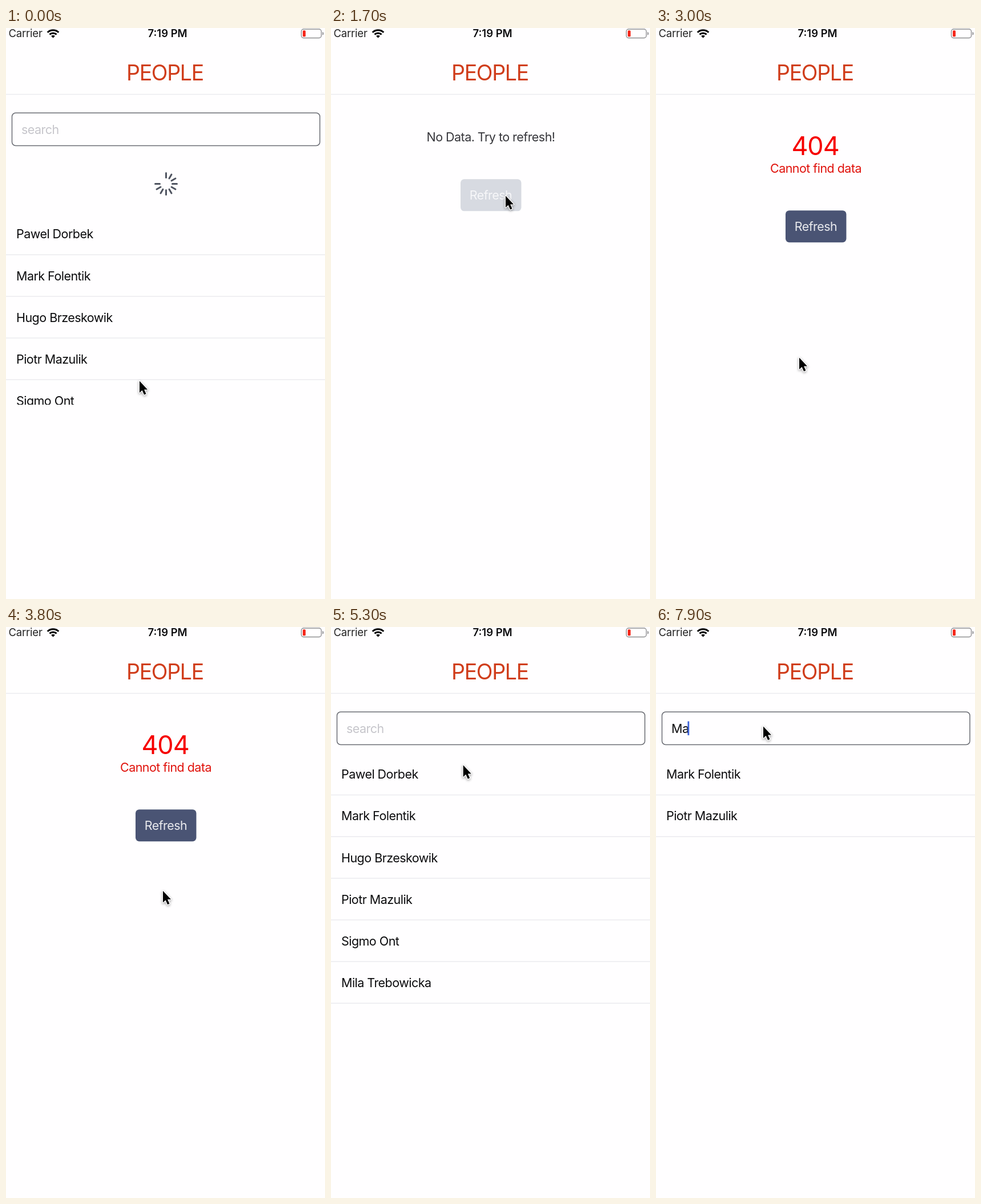
An HTML page with a canvas that plays this animation: 559 px wide and 1002 px high, repeating every 8000 ms.

```html
<!DOCTYPE html>
<html lang="en">
<head>
<meta charset="utf-8">
<title>People list</title>
<style>
  html, body { margin: 0; width: 100%; height: 100%; overflow: hidden; background: #fffeff; }
  canvas { display: block; width: 559px; height: 1002px; }
</style>
</head>
<body>
<canvas id="stage"></canvas>
<script>
const W = 559, H = 1002, LOOP = 8000, STEP = 100;
const BG = '#fffeff', LINE = '#ebebef', SLATE = '#4a5474';
const MID = 280;
const LIST_TOP = 222, LIST_BOTTOM = 661, ROW = 73.1;

const canvas = document.getElementById('stage');
const ctx = canvas.getContext('2d');
const dpr = window.devicePixelRatio || 1;
canvas.width = W * dpr;
canvas.height = H * dpr;

const people = ['Pawel Dorbek', 'Mark Folentik', 'Hugo Brzeskowik',
  'Piotr Mazulik', 'Sigmo Ont', 'Mila Trebowicka'];

// Timelines: [start, value]; the latest started entry applies.
const scenes = [[0, 'list'], [300, 'empty'], [1900, 'list'], [2900, 'error'], [4600, 'list']];
const presses = [[0, false], [1500, true], [1800, false], [4400, true], [4600, false]];
const queries = [[0, ''], [6100, 'M'], [7700, 'Ma']];
const grabs = [[0, 373], [300, null], [2400, 247], [2900, null]];
const FOCUS = 5600;

// Pointer path: [time, x, y]
const path = [
  [0, 233, 618], [100, 233, 668], [200, 233, 703], [300, 233, 713],
  [400, 233, 713], [1300, 305, 293], [1900, 305, 293], [2300, 250, 247],
  [2400, 250, 247], [2800, 250, 577], [3400, 250, 577], [4200, 298, 346],
  [4900, 298, 346], [5600, 187, 173], [LOOP, 187, 173]
];

const entryAt = (list, t) => list.filter(e => e[0] <= t).pop();
const valueAt = (list, t) => entryAt(list, t)[1];

function pointerAt(t) {
  const i = path.findIndex(p => p[0] > t);
  const [t0, x0, y0] = path[i - 1], [t1, x1, y1] = path[i];
  const u = (t - t0) / (t1 - t0), k = u * u * (3 - 2 * u);
  return { x: x0 + (x1 - x0) * k, y: y0 + (y1 - y0) * k };
}

// Elastic resistance of an overscrolled list
function rubber(pull) {
  const size = LIST_BOTTOM - LIST_TOP;
  return pull > 0 ? size * (1 - 1 / (pull * 0.55 / size + 1)) : 0;
}

function text(str, x, y, { size = 21.5, color = '#0b0b0d', align = 'left', weight = 400, track = -0.025 } = {}) {
  ctx.font = `${weight} ${size}px Inter, Roboto, sans-serif`;
  ctx.letterSpacing = `${size * track}px`;
  ctx.textAlign = align;
  ctx.fillStyle = color;
  ctx.fillText(str, x, y);
  return ctx.measureText(str).width;
}

function box(x, y, w, h, r) {
  ctx.beginPath();
  ctx.roundRect(x, y, w, h, r);
}

function divider(y) {
  ctx.fillStyle = LINE;
  ctx.fillRect(0, y - 0.75, W, 1.5);
}

function drawStatus() {
  text('Carrier', 4.5, 16.2, { size: 18.5, color: '#222', track: -0.01 });
  text('7:19 PM', 283, 16.2, { size: 18.5, align: 'center', weight: 600, track: 0 });

  const cx = 82.5, cy = 17.5, a = Math.PI / 4;
  ctx.fillStyle = ctx.strokeStyle = '#000';
  ctx.lineWidth = 3;
  ctx.beginPath();
  ctx.moveTo(cx, cy);
  ctx.arc(cx, cy, 4.8, -3 * a, -a);
  ctx.fill();
  for (const r of [8.6, 13.8]) {
    ctx.beginPath();
    ctx.arc(cx, cy, r, -3 * a, -a);
    ctx.stroke();
  }

  ctx.strokeStyle = '#8e8e91';
  ctx.lineWidth = 1.4;
  box(517.5, 2, 35, 15.5, 4);
  ctx.stroke();
  ctx.fillStyle = '#8e8e91';
  box(554.5, 7, 2, 5.5, [0, 2, 2, 0]);
  ctx.fill();
  ctx.fillStyle = '#f5291c';
  box(520, 4.3, 5, 11, 1.5);
  ctx.fill();
}

function drawHeader() {
  text('PEOPLE', 278.5, 92, { size: 37.5, color: '#d03d1b', align: 'center', track: -0.035 });
  divider(116.5);
}

function drawSearch(t, query) {
  ctx.strokeStyle = '#6a6c73';
  ctx.lineWidth = 1.5;
  box(10.5, 149, 539.5, 57.5, 6.5);
  ctx.stroke();
  let caret = 27;
  if (query) caret += text(query, 27, 185.5) - 2;
  else text('search', 27, 185.5, { color: '#c6c5cb' });

  const since = t - Math.max(FOCUS, entryAt(queries, t)[0]);
  if (t >= FOCUS && since % 1000 < 500) {
    ctx.fillStyle = '#3d63dc';
    ctx.fillRect(caret, 165.5, 2.8, 24.5);
  }
}

function drawSpinner(offset) {
  const ticks = Math.min(12, Math.floor(offset / 10.2));
  ctx.save();
  ctx.translate(MID + 0.5, LIST_TOP + offset / 2);
  ctx.strokeStyle = '#4f5460';
  ctx.lineWidth = 3;
  ctx.lineCap = 'round';
  for (let i = 0; i < ticks; i++) {
    ctx.beginPath();
    ctx.moveTo(0, -11);
    ctx.lineTo(0, -19);
    ctx.stroke();
    ctx.rotate(Math.PI / 6);
  }
  ctx.restore();
}

function drawList(t, pointer) {
  const query = valueAt(queries, t), grab = valueAt(grabs, t);
  const offset = grab === null ? 0 : rubber(pointer.y - grab);
  drawSearch(t, query);
  ctx.save();
  ctx.beginPath();
  ctx.rect(0, LIST_TOP, W, LIST_BOTTOM - LIST_TOP);
  ctx.clip();
  drawSpinner(offset);
  people.filter(name => name.includes(query)).forEach((name, i) => {
    const top = LIST_TOP + offset + i * ROW;
    text(name, 18, top + 44.3);
    divider(top + 72.7);
  });
  ctx.restore();
}

function drawButton(y, pressed) {
  ctx.fillStyle = pressed ? '#d7dae1' : SLATE;
  box(227, y, 106.5, 56, 6.5);
  ctx.fill();
  text('Refresh', MID, y + 36, { align: 'center', color: pressed ? '#f7f7f9' : '#e9eaee' });
}

function drawEmpty(pressed) {
  text('No Data. Try to refresh!', MID, 199.3, { align: 'center', color: '#36363b' });
  drawButton(265.3, pressed);
}

function drawError(pressed) {
  text('404', 279, 223, { size: 45, align: 'center', color: '#f60000' });
  text('Cannot find data', MID, 254, { align: 'center', color: '#e0120c' });
  drawButton(320.2, pressed);
}

function drawPointer({ x, y }) {
  const arrow = new Path2D('M0 0V23.5L5.3 18.6L9.3 27.6L13.2 25.9L9.3 17.2H16.2Z');
  ctx.save();
  ctx.translate(x + 1, y + 1.5);
  ctx.scale(0.87, 0.87);
  ctx.lineJoin = 'round';
  ctx.lineWidth = 3;
  ctx.strokeStyle = '#fff';
  ctx.shadowColor = 'rgba(0,0,0,0.4)';
  ctx.shadowBlur = 4 * dpr;
  ctx.shadowOffsetY = 1.5 * dpr;
  ctx.stroke(arrow);
  ctx.shadowColor = 'transparent';
  ctx.fillStyle = '#000';
  ctx.fill(arrow);
  ctx.restore();
}

function draw(t) {
  const pointer = pointerAt(t), scene = valueAt(scenes, t), pressed = valueAt(presses, t);
  ctx.setTransform(dpr, 0, 0, dpr, 0, 0);
  ctx.fillStyle = BG;
  ctx.fillRect(0, 0, W, H);
  drawStatus();
  drawHeader();
  if (scene === 'list') drawList(t, pointer);
  else if (scene === 'empty') drawEmpty(pressed);
  else drawError(pressed);
  drawPointer(pointer);
}

const start = performance.now();
function tick() {
  const t = (performance.now() - start) % LOOP;
  draw(Math.floor(t / STEP) * STEP);
  requestAnimationFrame(tick);
}
tick();
</script>
</body>
</html>
```
